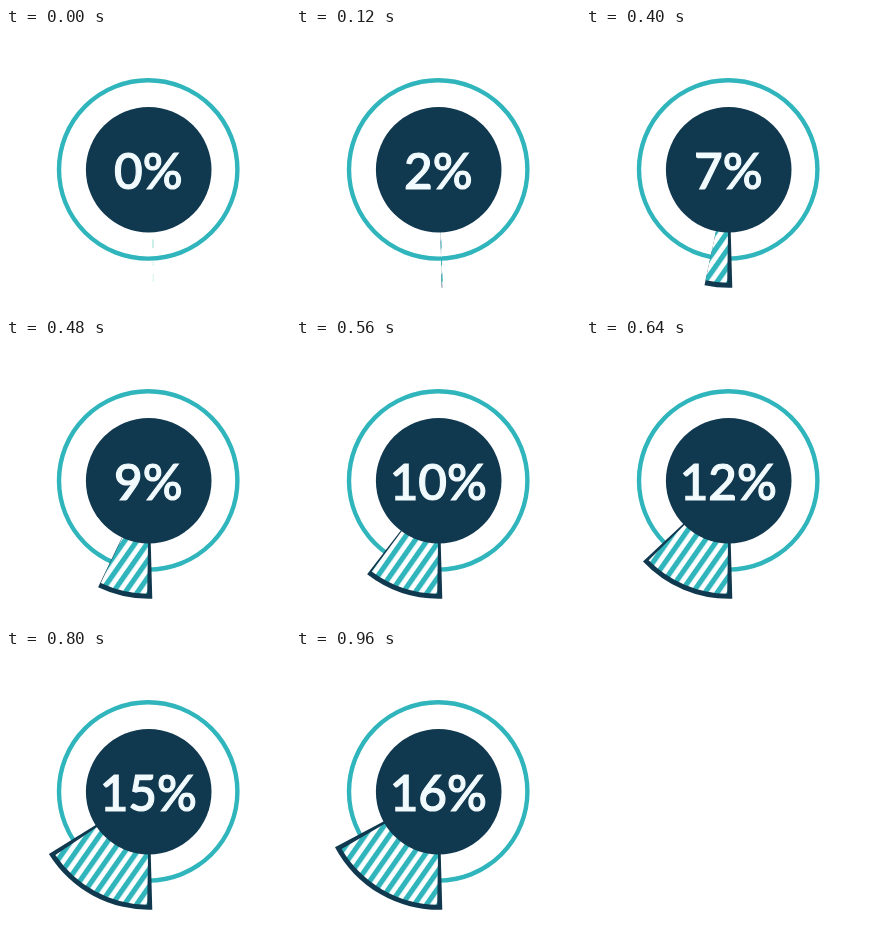
An HTML page for the animation above (1.08 s loop, 284 px wide and 283 px high).

```html
<!DOCTYPE html>
<html lang="en">
<head>
<meta charset="utf-8">
<title>Percentage dial</title>
<style>
  html, body { margin: 0; width: 100%; height: 100%; overflow: hidden; background: #fff; }
  svg { display: block; width: 284px; height: 283px; }
  text {
    font: 500 49.5px Lato, "Open Sans", sans-serif;
    fill: #f1fafc; stroke: #f1fafc; stroke-width: 1.2; text-anchor: middle;
  }
</style>
</head>
<body>
<svg viewBox="0 0 284 283">
  <defs>
    <pattern id="stripes" width="10" height="10" patternUnits="userSpaceOnUse"
             patternTransform="rotate(35) translate(.4 0)">
      <rect width="10" height="10" fill="#fff"/>
      <rect width="5.2" height="10" fill="#2fb5bb"/>
    </pattern>
  </defs>
  <circle cx="142.2" cy="141.4" r="89.2" fill="none" stroke="#2fb5bb" stroke-width="4.4"/>
  <g id="hint" fill="none" stroke="#bfeae2" stroke-width="1.6">
    <path d="M147 211.5V220"/>
    <path d="M147.3 232.5V238M147.3 246V254" opacity=".45"/>
  </g>
  <path id="rim" fill="#10384f"/>
  <path id="fill" fill="url(#stripes)"/>
  <circle cx="142.7" cy="141.7" r="62.8" fill="#10384f"/>
  <text id="label" x="142.3" y="160.6">0%</text>
</svg>
<script>
  const LOOP = 1080, STEP = 40, CX = 143, CY = 142;
  const START = -1.6;
  // sweep angle in degrees from straight down, one value per 80 ms from 80 ms on
  const SWEEP = [-1.5, -1, 0.2, 3.6, 12, 25.6, 37.6, 46.9, 53.6, 58.2, 60.9, 62];
  const $ = id => document.getElementById(id);
  const [hint, rim, fill, label] = ['hint', 'rim', 'fill', 'label'].map($);

  const clamp = (v, lo, hi) => Math.min(hi, Math.max(lo, v));

  function sweepAt(t) {
    const x = (t - 80) / 80, i = Math.floor(x), u = x - i;
    const p = k => SWEEP[clamp(k, 0, SWEEP.length - 1)];
    const [a, b, c, d] = [p(i - 1), p(i), p(i + 1), p(i + 2)];
    return b + u / 2 * (c - a + u * (2 * a - 5 * b + 4 * c - d + u * (3 * (b - c) + d - a)));
  }

  function sector(r, from, to) {
    if (to <= from) return '';
    const at = deg => {
      const q = deg * Math.PI / 180;
      return (CX - r * Math.sin(q)).toFixed(2) + ' ' + (CY + r * Math.cos(q)).toFixed(2);
    };
    return `M${CX} ${CY}L${at(from)}A${r} ${r} 0 0 1 ${at(to)}Z`;
  }

  function draw(time) {
    const t = Math.min(960, Math.floor(time % LOOP / STEP) * STEP);
    const idle = t < 80;
    label.textContent = Math.min(16, Math.floor(t * 3 / 160)) + '%';
    hint.style.display = idle ? '' : 'none';
    const end = idle ? START : sweepAt(t);
    const edge = 2.3 * clamp((end - 20) / 42, 0, 1);
    rim.setAttribute('d', sector(117.8, START, end));
    fill.setAttribute('d', idle ? '' : sector(112.8, Math.min(0.9, end - 0.6), end - edge));
  }

  const t0 = performance.now();
  function tick() {
    draw(performance.now() - t0);
    requestAnimationFrame(tick);
  }
  tick();
</script>
</body>
</html>
```
